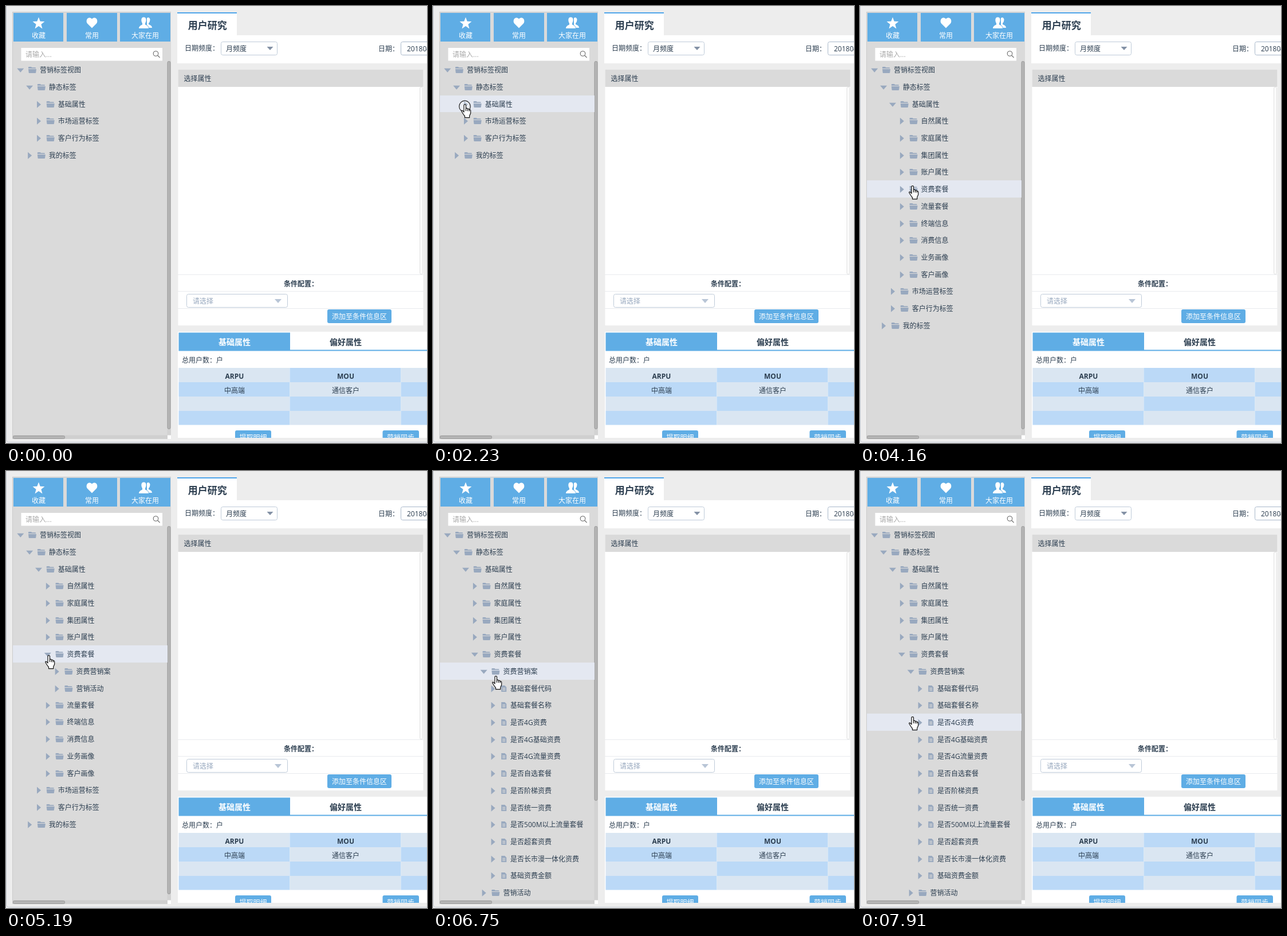
These frames come from a looping animation (735 px wide and 762 px high, 8000 ms). An HTML page:

```html
<!DOCTYPE html>
<html lang="zh-CN">
<head>
<meta charset="utf-8">
<title>用户研究</title>
<style>
  html, body { margin: 0; width: 100%; height: 100%; overflow: hidden; background: #f4f4f4; }
  body { position: relative; }
  svg { display: block; }
  text { font: 12px "Open Sans", "Noto Sans CJK SC", "Noto Sans CJK", sans-serif; fill: #2c3e50; }
  .m { font-weight: 500; }
  .b { font-weight: 700; }
  .mid { text-anchor: middle; }
  .w { fill: #fff; }
  .layer { position: absolute; left: 0; top: 0; }
  #view { position: absolute; left: 12px; top: 96.1px; width: 270px; height: 651.4px; overflow: hidden; }
  #band { position: absolute; width: 270px; height: 29.72px; background: #e4e8f1; }
  #tree { position: relative; }
  .kids { overflow: hidden; }
  .row { height: 29.72px; }
</style>
</head>
<body>
<svg class="layer" width="735" height="762">
  <defs>
    <clipPath id="cut"><rect x="300" y="568" width="435" height="185"/></clipPath>
  </defs>
  <rect x=".5" y="-9.5" width="800" height="770" rx="4" fill="#ededed" stroke="#c6ccd6"/>

  <!-- side panel -->
  <rect x="11" y="10" width="277" height="745" fill="#dadada"/>
  <path d="M11.500 755V10.500H288" fill="none" stroke="#cbcbcb"/>
  <g fill="#5fade5">
    <rect x="13" y="12" width="87" height="50"/>
    <rect x="106" y="12" width="88" height="50"/>
    <rect x="199" y="12" width="88" height="50"/>
  </g>
  <g class="w">
    <path id="star"/>
    <path d="M150 38.500L142 30.500C138 25 143.500 16.500 150 22.500C156.500 16.500 162 25 158 30.500Z"/>
    <path d="M246 21Q250 18.500 251.500 23Q251.500 28 249 30V32Q255 34 255 38H250Q249 35 246 33Z"/>
    <path d="M240.500 19.500C245.500 19.500 245.500 26 243 30V32.500Q249 34.500 249 39H232Q232 34.500 238 32.500V30C235.500 26 235.500 19.500 240.500 19.500Z"/>
  </g>
  <g class="mid">
    <text class="m w" x="57" y="55.500">收藏</text>
    <text class="m w" x="150" y="55.500">常用</text>
    <text class="m w" x="243" y="55.500">大家在用</text>
  </g>
  <rect x="26.500" y="73" width="246.500" height="22.500" fill="#fff"/>
  <text x="34" y="89" style="fill:#a9a9a9">请输入...</text>
  <g fill="none" stroke="#666" stroke-width="1.100"><circle cx="261.500" cy="83" r="4.300"/><path d="M264.700 86.200L268.500 90"/></g>
  <rect x="12" y="748.500" width="270" height="6.500" fill="#cfcfcf"/>
  <rect x="12.500" y="749.500" width="90" height="5" rx="2" fill="#b5b5b5" stroke="#999"/>
  <rect x="282" y="748.500" width="6" height="6.500" fill="#fff"/>
  <rect x="281.500" y="96" width="6.500" height="652" fill="#d2d2d2"/>
  <rect id="thumb" x="282" y="96.500" width="5" rx="2.500" fill="#b5b5b5" stroke="#999"/>

  <!-- page tab and filters -->
  <rect x="299" y="11" width="104" height="41" fill="#fff"/>
  <rect x="299" y="11" width="104" height="2" fill="#4fa5ea"/>
  <text class="b" x="317.800" y="40.200" style="font-size:17px">用户研究</text>
  <rect x="299" y="51" width="436" height="49" fill="#fff"/>
  <text x="312" y="77.500">日期频度：</text>
  <text x="650" y="78.500">日期：</text>
  <g fill="#fff" stroke="#bfcbd9">
    <rect x="375.500" y="62.500" width="98" height="23" rx="3"/>
    <rect x="689.500" y="62.500" width="90" height="23" rx="3" stroke="#a9b8cb"/>
  </g>
  <text x="384" y="79">月频度</text>
  <text x="700" y="79">201804</text>
  <path d="M455.500 71H466.500L461 77Z" fill="#8391a5"/>

  <!-- attribute picker -->
  <rect x="300.500" y="111" width="428" height="446" fill="#fff"/>
  <rect x="300.500" y="111" width="428" height="30" fill="#dadada"/>
  <text x="310.500" y="130.500">选择属性</text>
  <rect x="722.500" y="141.500" width="5" height="326" rx="2" fill="#fafafa" stroke="#e2e2e2"/>
  <path d="M300 468.500H729M300 497.500H729M300 527.500H729" stroke="#e9ebee"/>
  <text class="b" x="485" y="488.500">条件配置：</text>
  <rect x="315.500" y="502.500" width="176" height="23" rx="3" fill="#fff" stroke="#bfcbd9"/>
  <text x="326" y="519" style="fill:#97a8be">请选择</text>
  <path d="M469 511H481L475 518Z" fill="#b8c5d6"/>
  <rect x="561" y="529" width="112" height="24" rx="3" fill="#5fade5"/>
  <text class="m w mid" x="617" y="545.500">添加至条件信息区</text>

  <!-- result table -->
  <g clip-path="url(#cut)">
    <rect x="300" y="568" width="435" height="185" fill="#fff"/>
    <rect x="301.500" y="569.500" width="194.500" height="32" fill="#5fade5"/>
    <rect x="496" y="599.500" width="239" height="2" fill="#5fade5"/>
    <g class="mid">
      <text class="b w" x="399" y="591" style="font-size:14px">基础属性</text>
      <text class="b" x="593" y="591" style="font-size:14px">偏好属性</text>
    </g>
    <text x="307" y="621.500">总用户数：户</text>
    <g id="cells"></g>
    <g class="mid">
      <text class="b" x="399" y="650">ARPU</text>
      <text class="b" x="593" y="650">MOU</text>
      <text class="m" x="399" y="675">中高端</text>
      <text class="m" x="593" y="675">通信客户</text>
      <rect x="400" y="740" width="63" height="24" rx="3" fill="#5fade5"/>
      <rect x="657.500" y="740" width="63.500" height="24" rx="3" fill="#5fade5"/>
      <text class="m w" x="431.500" y="757">提取明细</text>
      <text class="m w" x="689" y="757">营销同步</text>
    </g>
  </g>
</svg>

<div id="view"><div id="band"></div><div id="tree"></div></div>

<svg class="layer" width="735" height="762">
  <g id="cursor">
    <circle id="ring" cx="6.500" cy="4" r="9.800" fill="#fff" fill-opacity=".25" stroke="#222" stroke-width="1.200"/>
    <path id="arrow" d="M.5 .8V16L4 12.700L6.500 18.500L9 17.500L6.500 11.800H11.500Z" fill="#fff" stroke="#000"/>
    <g id="hand" stroke="#111" stroke-width="1.200" stroke-linejoin="round">
      <path fill="#fff" d="M5 14V2Q5 .6 6.700 .6Q8.500 .6 8.500 2V8Q9 6.900 10.400 7.300Q11.500 7.700 11.500 9Q12.200 7.900 13.400 8.400Q14.300 8.900 14.300 10Q15 9.200 16 9.900Q16.700 10.400 16.700 11.500V16L14.700 20.500V23.700H6.500V21Q4 18 2 14.500Q.2 12 1 11.300Q2.500 10.300 5 14Z"/>
      <path fill="none" d="M8.500 8V12M11.500 9V12.200M14.300 10V12.500"/>
    </g>
  </g>
</svg>

<script>
const $ = id => document.getElementById(id);
const LOOP = 8000, ROW = 29.72, INDENT = 15.85;

// [label, children, name of the animated fold]
const folders = text => text.split(' ').map(label => [label]);
const plans = folders('基础套餐代码 基础套餐名称 是否4G资费 是否4G基础资费 是否4G流量资费 是否自选套餐 ' +
  '是否阶梯资费 是否统一资费 是否500M以上流量套餐 是否超套资费 是否长市漫一体化资费 基础资费金额');
const data = [['营销标签视图', [
  ['静态标签', [
    ['基础属性', [
      ...folders('自然属性 家庭属性 集团属性 账户属性'),
      ['资费套餐', [['资费营销案', plans, 'plan'], ['营销活动']], 'tariff'],
      ...folders('流量套餐 终端信息 消费信息 业务画像 客户画像')
    ], 'basic'],
    ...folders('市场运营标签 客户行为标签')
  ]],
  ['我的标签']
]]];

const FOLDER = '<path fill="#99a9bf" d="M0 3V1Q0 0 1 0H5L6.200 1.300H12Q13 1.300 13 2.300V3ZM0 4H14L13.200 10.300Q13 11 12.300 11H1.500Q.8 11 .7 10.300Z"/>';
const FILE = '<path fill="#99a9bf" d="M0 0H6L9 3V11H0Z"/><path stroke="#dadada" d="M2 4.500H7M2 6.500H7M2 8.500H7"/>';
const folds = {};

function build(nodes, parent, level) {
  for (const [label, kids, fold] of nodes) {
    const x = level * INDENT, leaf = level === 5;
    const row = document.createElement('div');
    row.className = 'row';
    row.innerHTML = `<svg width="270" height="30">
      <g transform="translate(${13.3 + x} 15.800)"><path fill="#99a9bf" d="M-3-6L4 0L-3 6Z"${kids ? ' transform="rotate(90)"' : ''}/></g>
      <g transform="translate(${27 + x + (leaf ? 1 : 0)} 9.900)">${leaf ? FILE : FOLDER}</g>
      <text x="${47 + x - (leaf ? 3.2 : 0)}" y="19.600">${label}</text></svg>`;
    parent.append(row);
    if (!kids) continue;
    const box = document.createElement('div');
    box.className = 'kids';
    parent.append(box);
    build(kids, box, level + 1);
    if (fold) folds[fold] = { box, mark: row.querySelector('path') };
  }
}
build(data, $('tree'), 0);

$('star').setAttribute('d', 'M' + Array.from({ length: 10 }, (_, i) => {
  const r = i % 2 ? 4.6 : 11, a = i * Math.PI / 5;
  return `${57 + r * Math.sin(a)} ${30.5 - r * Math.cos(a)}`;
}).join('L') + 'Z');

for (let r = 0; r < 4; r++) for (let c = 0; c < 3; c++) {
  $('cells').innerHTML += `<rect x="${301.5 + c * 194}" y="${631 + r * 25}" width="194" height="${r < 3 ? 25 : 24.5}" fill="${(r + c) % 2 ? '#bbd9f7' : '#dae6f2'}"/>`;
}

// Each step: start time and the values that change there
const steps = [
  [0, { shape: '', hover: -1, ring: 0, basic: 0, tariff: 0, plan: 0, x: 26, y: 0 }],
  [1440, { shape: 'arrow' }],
  [1580, { x: 45, y: 70 }],
  [1700, { shape: 'hand', x: 62, y: 130, hover: 1 }],
  [1820, { x: 71, y: 171, hover: 2 }],
  [1970, { x: 60, y: 176 }],
  [2090, { x: 49, y: 171 }],
  [2230, { ring: 1 }],
  [2350, { basic: .06 }],
  [2480, { ring: 0, basic: .65 }],
  [2600, { basic: .99 }],
  [2750, { basic: 1 }],
  [2870, { x: 48, y: 172 }],
  [3520, { x: 61, y: 201, hover: 3 }],
  [3640, { x: 66, y: 236, hover: 4 }],
  [3770, { x: 75, y: 280, hover: 6 }],
  [3920, { x: 80, y: 294 }],
  [4040, { x: 83, y: 305, hover: 7 }],
  [4160, { x: 85, y: 313 }],
  [4310, { x: 81, y: 323 }],
  [4590, { x: 78, y: 325 }],
  [4740, { x: 68, y: 321 }],
  [4890, { ring: 1 }],
  [5040, { tariff: .08 }],
  [5190, { ring: 0, tariff: .99 }],
  [5340, { tariff: 1 }],
  [5780, { x: 71, y: 331 }],
  [5900, { x: 76, y: 343, hover: 8 }],
  [6060, { x: 78, y: 352 }],
  [6320, { ring: 1, plan: .7 }],
  [6470, { ring: 0, plan: .98 }],
  [6600, { plan: 1 }],
  [6750, { x: 103, y: 357 }],
  [6900, { x: 150, y: 397, hover: 9 }],
  [7050, { x: 180, y: 418, hover: 10 }],
  [7210, { x: 229, y: 426, hover: 11 }],
  [7760, { x: 115, y: 427 }],
  [7910, { x: 85, y: 428 }]
];

const show = (id, on) => { $(id).style.display = on ? '' : 'none'; };

function draw(time) {
  const s = Object.assign({}, ...steps.filter(([at]) => at <= time).map(step => step[1]));
  const planH = 12 * ROW * s.plan;
  const heights = { plan: planH, tariff: (2 * ROW + planH) * s.tariff };
  heights.basic = (10 * ROW + heights.tariff) * s.basic;
  for (const name in folds) {
    folds[name].box.style.height = heights[name] + 'px';
    folds[name].mark.setAttribute('transform', `rotate(${90 * s[name]})`);
  }
  const content = 6 * ROW + heights.basic;
  $('thumb').setAttribute('height', 641 * Math.min(1, 665 / content));
  show('band', s.hover >= 0);
  $('band').style.top = s.hover * ROW + 'px';
  $('cursor').setAttribute('transform', `translate(${s.x} ${s.y})`);
  show('arrow', s.shape === 'arrow');
  show('hand', s.shape === 'hand');
  show('ring', s.ring);
}

const start = performance.now();
function tick() {
  draw((performance.now() - start) % LOOP);
  requestAnimationFrame(tick);
}
tick();
</script>
</body>
</html>
```
